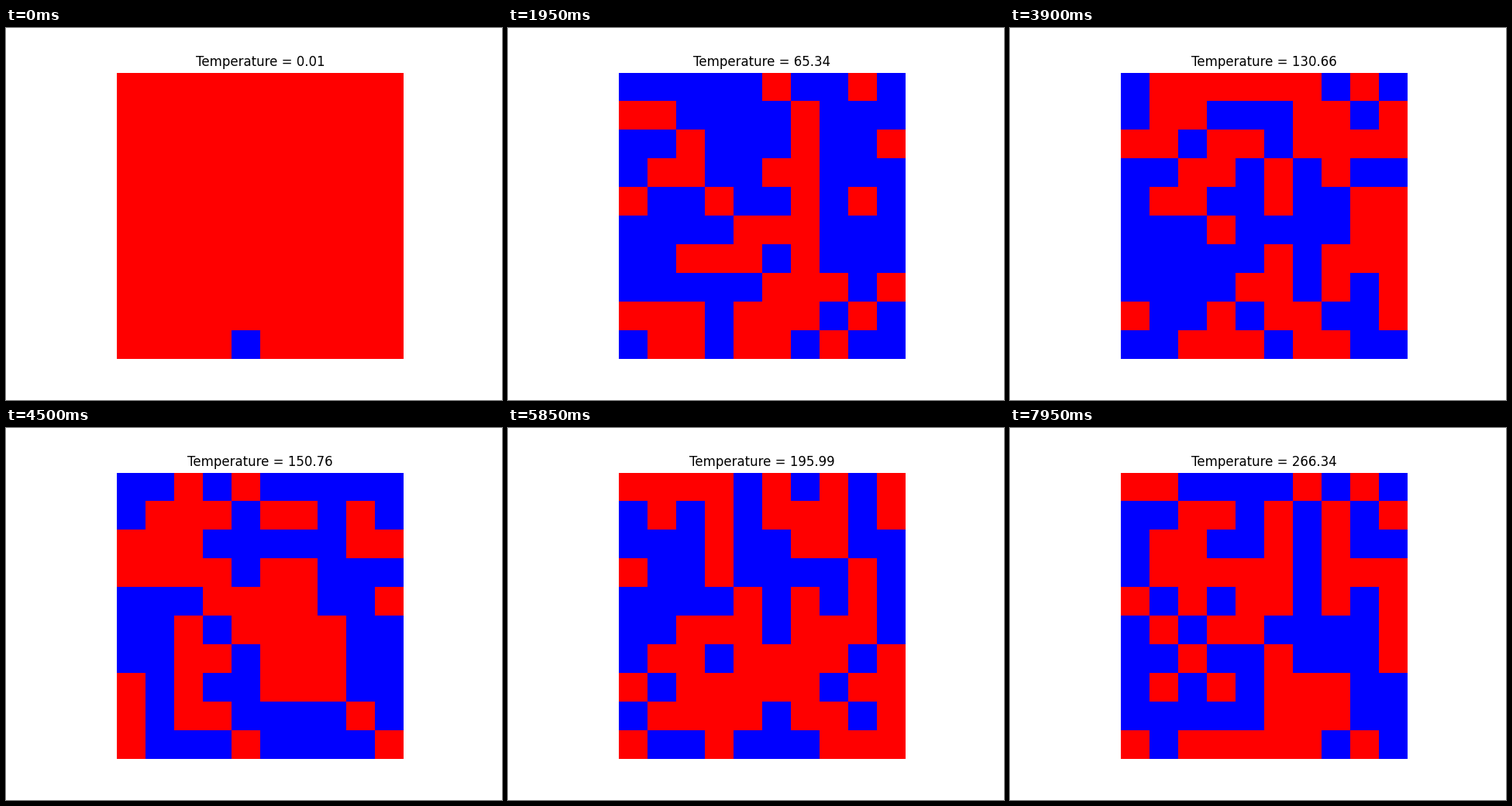
A matplotlib script that plays this animation: 640 by 480 pixels, repeating every 8000 ms.

```python
import matplotlib.pyplot as plt
import numpy as np
from matplotlib.animation import FuncAnimation
from matplotlib.colors import ListedColormap

SIZE = 10
TICK_MS, LOOP_MS = 50, 8000
TICKS_PER_STEP = 3
TICKS = LOOP_MS // TICK_MS
STEPS = -(-TICKS // TICKS_PER_STEP)
SWEEPS = 6

temperatures = np.linspace(0.01, 1000, 200)[:STEPS]
rng = np.random.default_rng(7)
rows, cols = np.indices((SIZE, SIZE))


def sweep(spins, temperature):
    """Heat-bath update of both checkerboard halves, with periodic edges."""
    for parity in (0, 1):
        field = sum(np.roll(spins, shift, axis) for shift in (-1, 1) for axis in (0, 1))
        chance_up = 1 / (1 + np.exp(-2 * field / temperature))
        drawn = np.where(rng.random(spins.shape) < chance_up, 1, -1)
        spins = np.where((rows + cols) % 2 == parity, drawn, spins)
    return spins


def simulate():
    spins = np.ones((SIZE, SIZE), dtype=int)
    spins[9, 4] = -1
    history = [spins]
    for temperature in temperatures[1:]:
        for _ in range(SWEEPS):
            spins = sweep(spins, temperature)
        history.append(spins)
    return history


lattices = simulate()

fig, ax = plt.subplots(figsize=(6.4, 4.8), dpi=100)
ax.axis("off")
image = ax.imshow(lattices[0], cmap=ListedColormap(["blue", "red"]), vmin=-1, vmax=1)
title = ax.set_title("")


def update(tick):
    step = tick // TICKS_PER_STEP
    image.set_data(lattices[step])
    title.set_text(f"Temperature = {temperatures[step]:.2f}")
    return image, title


animation = FuncAnimation(fig, update, frames=TICKS, interval=TICK_MS,
                          repeat=True, repeat_delay=0)
plt.show()
```
